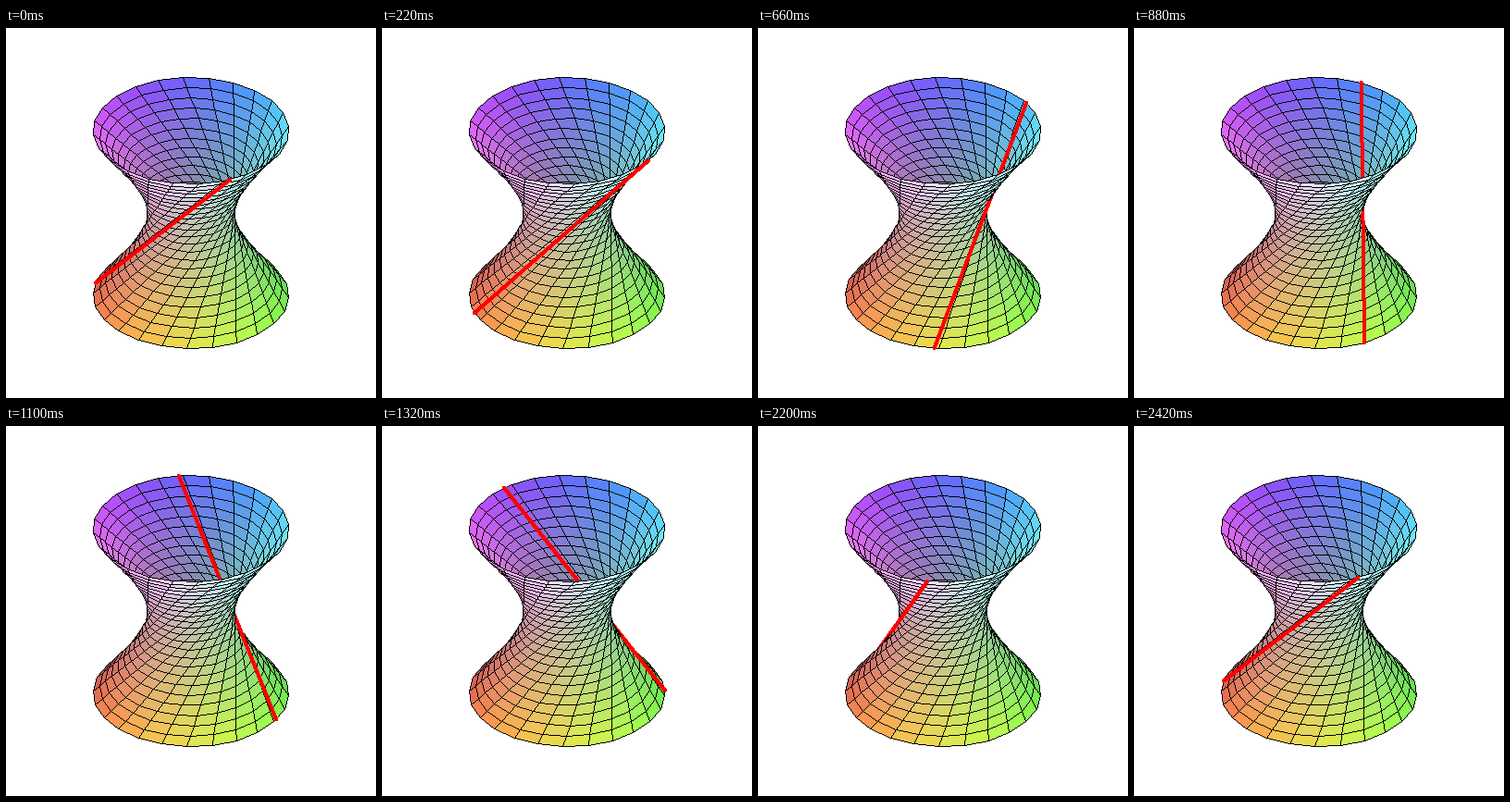
A matplotlib script for the animation above (2.53 s loop, 400 by 400 pixels).

```python
import numpy as np
import matplotlib.pyplot as plt
from matplotlib.animation import FuncAnimation
from matplotlib.collections import PolyCollection

FRAMES, INTERVAL = 23, 110
DPI, SIZE = 100, 400
PX = 72 / DPI                    # one pixel in points
GRID = 24                        # mesh cells each way
V_MAX = 2                        # rulings run from -V_MAX to V_MAX
RADIUS = 106                     # rim radius in pixels
TURN = np.radians(1.0)           # mesh offset seen from the camera
THETA = np.radians(134)          # camera frame to surface frame
PHI = np.radians(57)             # camera tilt from the vertical
RIM = np.hypot(1, V_MAX)


def ruled(u, v):
    """Point of the hyperboloid scaled to the cube [-1, 1]^3."""
    x = (np.cos(u) - v * np.sin(u)) / RIM
    y = (np.sin(u) + v * np.cos(u)) / RIM
    return np.stack([x, y, v / V_MAX + 0 * u], axis=-1)


def project(p):
    x, y, z = np.moveaxis(p, -1, 0)
    up = z * np.sin(PHI) + y * np.cos(PHI)
    return SIZE / 2 + RADIUS * np.stack([x, up], axis=-1)


def facing(p):
    """Positive where the outer side looks at the camera."""
    slope = V_MAX**2 / RIM**2
    return -np.sin(PHI) * p[..., 1] - slope * np.cos(PHI) * p[..., 2]


def shade(p):
    """Red, green and blue follow the x, y and z coordinates."""
    x, y, z = np.moveaxis(p, -1, 0)
    c, s = np.cos(THETA), np.sin(THETA)
    axes = np.stack([c * x - s * y, s * x + c * y, z], axis=-1)
    return np.clip(0.3 + 0.35 * (axes + 1), 0, 1)


def mesh():
    """Cell corners as whole pixels, cell colours and a front-side mask."""
    u = TURN + np.linspace(0, 2 * np.pi, GRID + 1)
    v = np.linspace(-V_MAX, V_MAX, GRID + 1)
    p = ruled(*np.meshgrid(u, v))
    quads = np.stack([p[:-1, :-1], p[:-1, 1:], p[1:, 1:], p[1:, :-1]], axis=2)
    quads = quads.reshape(-1, 4, 3)
    flat = project(quads)
    d1, d2 = flat[:, 2] - flat[:, 0], flat[:, 3] - flat[:, 1]
    front = d1[:, 0] * d2[:, 1] - d1[:, 1] * d2[:, 0] > 0
    return np.floor(flat), shade(quads.mean(axis=1)), front


def thin_line(a, b):
    """Pixels of a hard one-pixel line between two pixels."""
    steps = int(np.abs(b - a).max())
    return np.floor(np.linspace(a, b, steps + 1) + 0.5)


def add_layer(corners, colors, order):
    ax.add_collection(PolyCollection(
        corners + 0.5, facecolors=colors, linewidths=0, zorder=order))
    edges = [thin_line(q[i - 1], q[i]) for q in corners for i in range(4)]
    dots = np.unique(np.concatenate(edges), axis=0)
    square = np.array([[0, 0], [1, 0], [1, 1], [0, 1]])
    ax.add_collection(PolyCollection(
        dots[:, None] + square, facecolors="black", linewidths=0,
        zorder=order + 0.5))


fig = plt.figure(figsize=(SIZE / DPI, SIZE / DPI), dpi=DPI, facecolor="white")
ax = fig.add_axes([0, 0, 1, 1])
ax.set(xlim=(0, SIZE), ylim=(0, SIZE))
ax.axis("off")

corners, colors, front = mesh()
add_layer(corners[~front], colors[~front], 1)
add_layer(corners[front], colors[front], 3)


def red_line(order):
    return ax.plot([], [], color="red", lw=3 * PX, zorder=order,
                   solid_capstyle="round", antialiased=False)[0]


inner, outer = red_line(2), red_line(4)


def update(i):
    u = TURN + (i - 8) * 2 * np.pi / (FRAMES - 1)
    ends = ruled(u, np.array([-V_MAX, V_MAX], dtype=float))
    low, high = facing(ends)
    # facing is linear along a ruling, so it changes sign at most once
    if low * high < 0:
        middle = ends[0] + (ends[1] - ends[0]) * low / (low - high)
        parts = [np.array([ends[0], middle]), np.array([middle, ends[1]])]
    else:
        parts = [ends]
    inner.set_data([], [])
    outer.set_data([], [])
    for part in parts:
        line = outer if facing(part.mean(axis=0)) > 0 else inner
        line.set_data(*project(part).T)
    return inner, outer


anim = FuncAnimation(fig, update, frames=FRAMES, interval=INTERVAL,
                     repeat=True, repeat_delay=0, blit=False)
plt.show()
```
